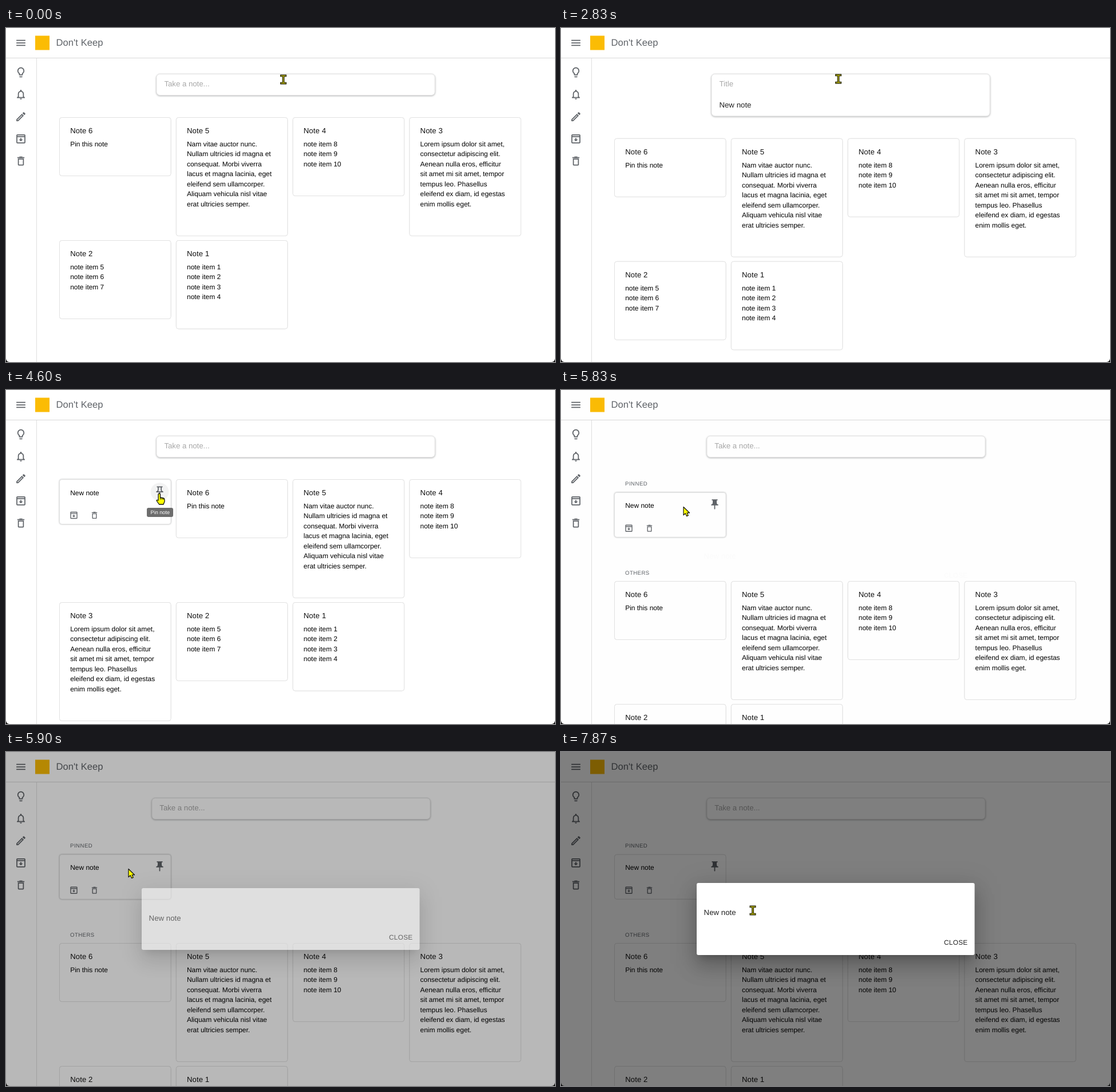
An HTML page for the animation above (8000 ms loop, 959 px wide and 584 px high).

```html
<!DOCTYPE html>
<html lang="en">
<head>
<meta charset="utf-8">
<title>Notes</title>
<style>
  html, body { margin: 0; width: 100%; height: 100%; overflow: hidden; background: #fff; }
  svg { display: block; width: 959px; height: 584px; font-family: "Liberation Sans", Arial, sans-serif; }
  text { text-rendering: geometricPrecision; }
  .card { fill: #fff; stroke: #e2e2e2; filter: drop-shadow(0 .8px .6px rgba(0,0,0,.11)); }
  .field { filter: drop-shadow(0 1px 1.5px rgba(60,64,67,.38)); }
  .raised { filter: drop-shadow(.8px .8px 1.3px rgba(60,64,67,.4)); }
  .blur-a { filter: blur(16.6px); }
  .blur-b { filter: blur(20px); }
  .blur-c { filter: blur(6.5px); }
</style>
</head>
<body>
<svg id="stage" viewBox="0 0 959 584"></svg>
<script>
const LOOP = 8000;
const stage = document.getElementById('stage');

const ICONS = {
  menu: 'M3 18h18v-2H3v2zm0-5h18v-2H3v2zm0-7v2h18V6H3z',
  bulb: 'M9 21c0 .55.45 1 1 1h4c.55 0 1-.45 1-1v-1H9v1zm3-19C8.14 2 5 5.14 5 9c0 2.38 1.19 4.47 3 5.74V17c0 .55.45 1 1 1h6c.55 0 1-.45 1-1v-2.26c1.81-1.27 3-3.36 3-5.74 0-3.86-3.14-7-7-7zm2.85 11.1l-.85.6V16h-4v-2.3l-.85-.6C7.8 12.16 7 10.63 7 9c0-2.76 2.24-5 5-5s5 2.24 5 5c0 1.63-.8 3.16-2.15 4.1z',
  bell: 'M12 22c1.1 0 2-.9 2-2h-4c0 1.1.9 2 2 2zm6-6v-5c0-3.07-1.63-5.64-4.5-6.32V4c0-.83-.67-1.5-1.5-1.5s-1.5.67-1.5 1.5v.68C7.64 5.36 6 7.92 6 11v5l-2 2v1h16v-1l-2-2zm-2 1H8v-6c0-2.48 1.51-4.5 4-4.5s4 2.02 4 4.5v6z',
  edit: 'M14.06 9.02l.92.92L5.92 19H5v-.92l9.06-9.06M17.66 3c-.25 0-.51.1-.7.29l-1.83 1.83 3.75 3.75 1.83-1.83c.39-.39.39-1.02 0-1.41l-2.34-2.34c-.2-.2-.45-.29-.71-.29zm-3.6 3.19L3 17.25V21h3.75L17.81 9.94l-3.75-3.75z',
  archive: 'M5 3Q3 3 3 5V19Q3 21 5 21H19Q21 21 21 19V5Q21 3 19 3zM5 5H19V6.5H5zM5 8.5H19V19H5zM11 10v3H8l4 4 4-4h-3v-3z',
  bin: 'M6 19c0 1.1.9 2 2 2h8c1.1 0 2-.9 2-2V7H6v12zM8 9h8v10H8V9zm7.5-5l-1-1h-5l-1 1H5v2h14V4h-3.5z',
  pinned: 'M16 9V4h1c.55 0 1-.45 1-1s-.45-1-1-1H7c-.55 0-1 .45-1 1s.45 1 1 1h1v5c0 1.66-1.34 3-3 3v2h5.97v7l1 1 1-1v-7H19v-2c-1.66 0-3-1.34-3-3z'
};
ICONS.pin = ICONS.pinned + 'M14 4v5c0 1.12.37 2.16 1 3H9c.65-.86 1-1.9 1-3V4h4z';

const NOTES = [
  ['Note 6', 'Pin this note'],
  ['Note 5', 'Nam vitae auctor nunc.', 'Nullam ultricies id magna et', 'consequat. Morbi viverra', 'lacus et magna lacinia, eget',
    'eleifend sem ullamcorper.', 'Aliquam vehicula nisl vitae', 'erat ultricies semper.'],
  ['Note 4', ...items(8, 10)],
  ['Note 3', 'Lorem ipsum dolor sit amet,', 'consectetur adipiscing elit.', 'Aenean nulla eros, efficitur',
    'sit amet mi sit amet, tempor', 'tempus leo. Phasellus', 'eleifend ex diam, id egestas', 'enim mollis eget.'],
  ['Note 2', ...items(5, 7)],
  ['Note 1', ...items(1, 4)]
].map(([title, ...lines]) => ({ title, lines, h: 84.5 + 17.5 * lines.length }));
const NEW_NOTE = { title: '', lines: ['New note'], h: 78 };

// time, x, y of the pointer
const PATH = [
  [0, 484.5, 90], [29, 484.5, 90], [30, 484.5, 89], [3000, 484.5, 89], [3700, 600, 465], [3820, 600, 465],
  [4330, 268, 181], [4850, 268, 181], [5600, 213.5, 204], [5920, 213.5, 204], [6300, 336, 278],
  [6360, 336, 278], [6500, 355, 287], [6710, 355, 287], [6800, 335, 277], [LOOP, 335, 277]
];

function items(from, to) {
  return Array.from({ length: to - from + 1 }, (_, i) => 'note item ' + (from + i));
}
const clamp = v => Math.max(0, Math.min(1, v));
const ramp = (t, from, to) => clamp((t - from) / (to - from));
const smooth = p => p * p * (3 - 2 * p);

// cubic-bezier(.4, 0, .2, 1)
function materialEase(p) {
  let lo = 0, hi = 1;
  for (let i = 0; i < 16; i++) {
    const s = (lo + hi) / 2, r = 1 - s;
    if (1.2 * r * r * s + .6 * r * s * s + s * s * s < p) lo = s; else hi = s;
  }
  return 3 * (1 - lo) * lo * lo + lo ** 3;
}

function pointerAt(t) {
  const i = Math.max(1, PATH.findIndex(k => k[0] > t));
  const [t0, x0, y0] = PATH[i - 1], [t1, x1, y1] = PATH[i];
  const p = smooth(ramp(t, t0, t1));
  return { x: x0 + (x1 - x0) * p, y: y0 + (y1 - y0) * p };
}

const inside = (p, b) => p.x > b.x && p.x < b.x + b.w && p.y > b.y && p.y < b.y + b.h;
// baselines sit on whole pixels
const text = (x, y, str, size, fill = '#111', spacing = 0) =>
  `<text x="${x}" y="${Math.round(y)}" font-size="${size}" fill="${fill}" letter-spacing="${spacing}">${str}</text>`;
const rect = (x, y, w, h, attrs) => `<rect x="${x}" y="${y}" width="${w}" height="${h}" ${attrs}/>`;
const icon = (name, cx, cy, size = 21, fill = '#5f6368') =>
  `<path transform="translate(${cx - size / 2} ${cy - size / 2}) scale(${size / 24})" fill="${fill}" fill-rule="evenodd" d="${ICONS[name]}"/>`;
const caret = (x, y) => rect(x, y, 1, 14, 'fill="#000"');

function grid(notes, top) {
  return notes.map((note, i) => ({
    ...note, x: 93 + 203.8 * (i % 4), y: top + 215 * Math.floor(i / 4), w: 195.5
  }));
}

function drawCard(c, raised, tools, isPinned, pinHot) {
  let out = rect(c.x + .5, c.y, c.w - 1, c.h, `rx="4" class="card ${raised ? 'raised' : ''}"`);
  const x = c.x + 19.2;
  if (c.title) out += text(x, c.y + 27.6, c.title, 13.125, '#111', .1);
  c.lines.forEach((line, i) => {
    out += text(x, c.y + (c.title ? 50.3 : 27) + 17.5 * i, line, 11.95, '#000');
  });
  if (tools) {
    out += icon('archive', c.x + 25.5, c.y + c.h - 15.5, 16.5) + icon('bin', c.x + 61.5, c.y + c.h - 15.5, 16);
    if (pinHot) out += `<circle cx="${c.x + 175.5}" cy="${c.y + 21.5}" r="15.8" fill="#f3f3f3"/>`;
    out += icon(isPinned ? 'pinned' : 'pin', c.x + 175.5, c.y + 20.7);
  }
  return out;
}

function drawInput(box, open, t) {
  const x = box.x + 13.5;
  const hint = '#a8a8a8';
  let out = rect(box.x, box.y, box.w, box.h, 'rx="6" class="card field"');
  if (!open) return out + text(x, 102.4, 'Take a note...', 13.2, hint);
  out += text(x, 102.4, 'Title', 13.2, hint, .05);
  const count = t < 1470 ? 0 : t < 1670 ? 1 : Math.min(8, 2 + Math.floor((t - 1670) / 105));
  const typed = 'New note'.slice(0, count);
  out += count ? text(x, 139.3, typed, 13.2, '#222', .05) : text(x, 139.3, 'Take a note...', 13.2, hint);
  const blinkOff = t < 270 || (t >= 830 && t < 1330) || t >= 2830;
  const widths = [0, 9.6, 17, 26.5, 30.2, 37.6, 45, 48.7, 54.7];
  return blinkOff ? out : out + caret(276 + widths[count], 128);
}

function drawDialog(t, fade) {
  const tall = t >= 7330;
  const b = tall ? { y: 229, h: 126 } : { y: 238, h: 108 };
  const shadow = (name, dy, spread, alpha) =>
    rect(237 - spread, b.y + dy - spread, 485.5 + 2 * spread, b.h + 2 * spread, `rx="4" class="blur-${name}" fill-opacity="${alpha}"`);
  let out = rect(0, 0, 959, 584, `fill-opacity="${.5 * fade}"`) + `<g opacity="${fade}">`;
  out += shadow('a', 21, 2.6, .14) + shadow('b', 8, 7, .12) + shadow('c', 9.6, -6, .2);
  out += rect(237, b.y, 485.5, b.h, 'rx="3" fill="#fff"');
  out += text(249.6, b.y + (tall ? 55.7 : 56.7), 'New note', 13.2, '#222', .05);
  out += text(669, b.y + b.h - 18, 'CLOSE', 11.8, '#222', .3);
  if (t >= 6500 && t < 7030) out += caret(306, 283);
  if (tall && t < 7870) out += caret(250, 293);
  return out + '</g>';
}

function drawPointer(p, kind) {
  const outline = 'stroke="#111" stroke-linejoin="round"';
  const beam = (color, width) =>
    `<path d="M-3.6 -6.6H3.6M0 -6.6V6.6M-3.6 6.6H3.6" fill="none" stroke="${color}" stroke-width="${width}" stroke-linecap="square"/>`;
  const shapes = {
    beam: beam('#1c1c00', 3.8) + beam('#b8b200', 1.5),
    arrow: `<path d="M.5 .5V14.8L3.8 11.8L6 16.6L8.8 15.4L6.6 10.8H11Z" fill="#ff0" ${outline} stroke-width="1.2"/>`,
    hand: `<path d="M-2 2Q-2 0 -.3 0Q1.5 0 1.5 2V7L7 8Q9 8.5 9 11V14L7 19H-.5L-5 12.5Q-5 10.5 -2 12Z" fill="#ff0" ${outline} stroke-width="1.3"/>
      <path d="M1.5 7V10.5M4.2 7.7V10.7M6.8 8.2V11" stroke="#111"/>`
  };
  return `<g transform="translate(${p.x} ${p.y})">${shapes[kind]}</g>`;
}

function drawShell() {
  const side = ['bulb', 'bell', 'edit', 'archive', 'bin'].map((n, i) => icon(n, 26, 77.5 + 38.8 * i)).join('');
  return rect(0, 0, 959, 584, 'fill="#fff"') +
    rect(0, 52, 959, 1, 'fill="#d8d8d8"') + rect(53, 53, 1, 531, 'fill="#dedede"') +
    icon('menu', 26, 26) + side +
    rect(51, 13.5, 25, 25, 'fill="#fbbc04"') +
    text(87.5, 31, "Don't Keep", 16.6, '#5f6368', .05);
}

function scene(t) {
  const p = pointerAt(t);
  const open = t >= 170 && t < 3700;
  const created = t >= 3700, pinned = t >= 4800;
  const fade = materialEase(ramp(t, 5817, 6042));
  const box = { x: pinned ? 254.8 : 262.9, y: 80.5, w: 486.3, h: open ? 73.5 : 37 };

  let cards;
  if (pinned) cards = [...grid([NEW_NOTE], 179.3), ...grid(NOTES, 334.5)];
  else cards = grid(created ? [NEW_NOTE, ...NOTES] : NOTES, open ? 193.25 : 156.5);

  let out = drawShell() + drawInput(box, open, t);
  if (pinned) out += text(112, 167.2, 'PINNED', 9.6, '#5f6368', .5) + text(112, 322.8, 'OTHERS', 9.6, '#5f6368', .45);

  let kind = inside(p, box) ? 'beam' : 'arrow';
  cards.forEach((c, i) => {
    const hover = inside(p, c) && t < 5940;
    const isPinned = pinned && i === 0;
    const pinHot = hover && Math.hypot(p.x - c.x - 175.5, p.y - c.y - 21.5) < 16;
    if (pinHot) kind = 'hand';
    out += drawCard(c, hover, hover || isPinned, isPinned, pinHot);
  });

  const tip = Math.min(ramp(t, 4480, 4600), 1 - ramp(t, 4800, 4920));
  if (tip > 0) {
    out += `<g opacity="${tip}">` + rect(246, 206, 46, 16, 'rx="3" fill="#6d6d6d"') +
      text(252.6, 217.3, 'Pin note', 9.1, '#fff') + '</g>';
  }
  if (fade > 0) {
    out += drawDialog(t, fade);
    if (inside(p, { x: 237, y: 238, w: 485, h: 108 })) kind = 'beam';
  }
  out += drawPointer(p, kind);
  return out + '<path d="M0 578Q.5 583.5 6 584H0ZM959 578Q958.5 583.5 953 584H959Z" fill="#111"/>';
}

let shown = '';
function frame(now) {
  const next = scene(now % LOOP);
  if (next !== shown) stage.innerHTML = shown = next;
  requestAnimationFrame(frame);
}
frame(performance.now());
</script>
</body>
</html>
```
